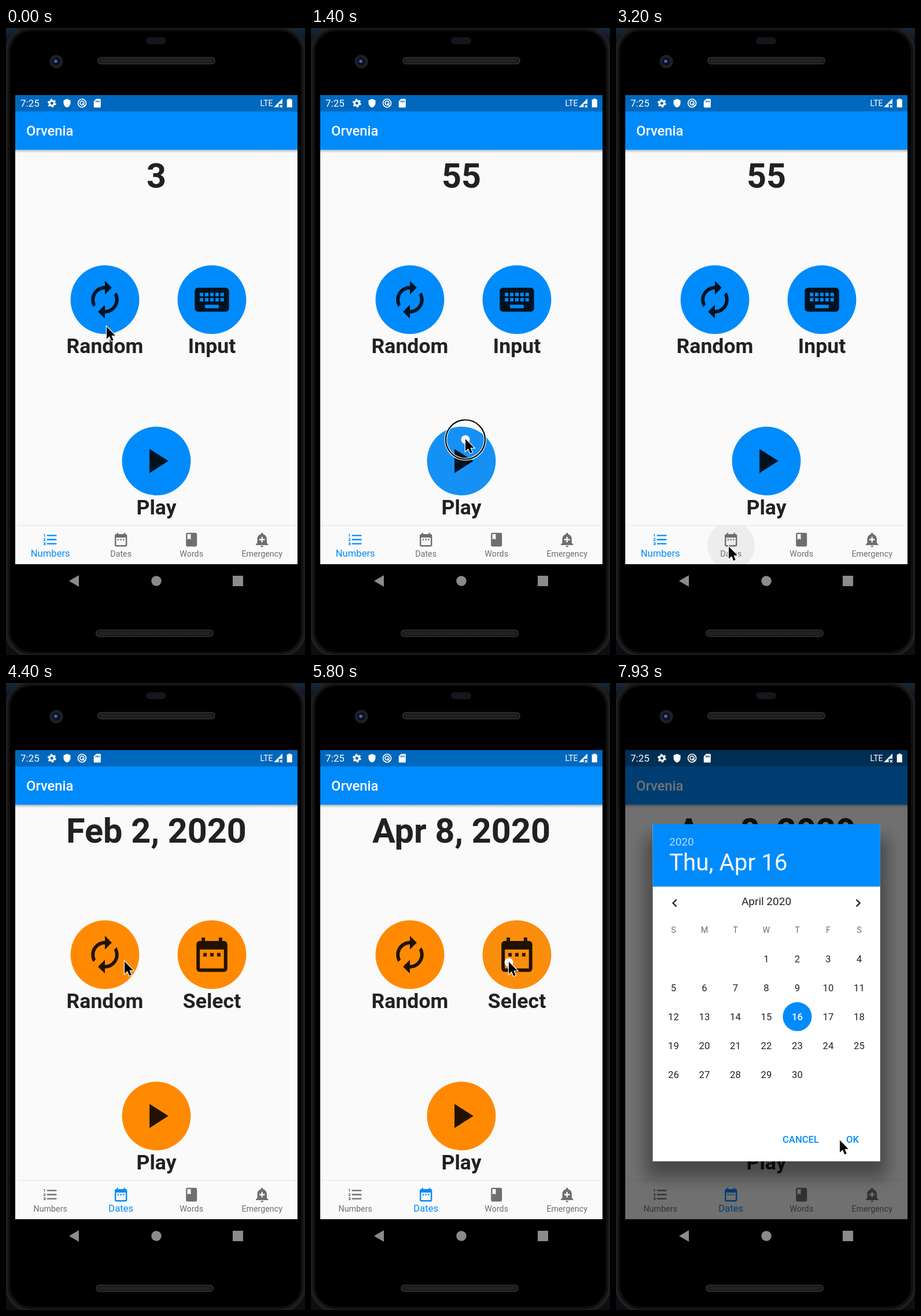
Write an HTML page that moves like this. It is 517 by 1084 pixels and loops after 8000 ms.

```html
<!DOCTYPE html>
<html lang="en">
<head>
<meta charset="utf-8">
<title>Speech practice app</title>
<style>
  html, body { margin: 0; width: 100%; height: 100%; overflow: hidden; background: #000; }
  svg { display: block; width: 100vw; height: 100vh; font-family: Roboto, sans-serif; }
  .ink { fill: #000; fill-opacity: .87; }
  .mid { text-anchor: middle; }
  .bold { font-weight: 700; }
  .medium { font-weight: 500; }
</style>
</head>
<body>
<svg id="stage" viewBox="0 0 517 1084"></svg>
<script>
const LOOP = 8000, BLUE = '#008bfc', ORANGE = '#ff8a02', GREY = '#6e6e6e';
const DP = 1.1875;

// 24-unit icons
const ICONS = {
  renew: '<path id="half" d="M12 6v3l4-4-4-4v3c-4.42 0-8 3.58-8 8 0 1.57.46 3.03 1.24 4.26L6.7 14.8c-.45-.83-.7-1.79-.7-2.8 0-3.31 2.69-6 6-6z"/><use href="#half" transform="rotate(180 12 12)"/>',
  keyboard: '<path fill-rule="evenodd" d="M4 5H20a2 2 0 0 1 2 2V17a2 2 0 0 1-2 2H4a2 2 0 0 1-2-2V7a2 2 0 0 1 2-2z' +
    [8, 11].map(y => [5, 8, 11, 14, 17].map(x => `M${x} ${y}h2v2h-2z`).join('')).join('') + 'M8 15h8v2H8z"/>',
  play: '<path d="M8 5v14l11-7z"/>',
  date: '<path d="M9 11H7v2h2zm4 0h-2v2h2zm4 0h-2v2h2zm2-7h-1V2h-2v2H8V2H6v2H5c-1.1 0-2 .9-2 2v14c0 1.1.9 2 2 2h14c1.1 0 2-.9 2-2V6c0-1.1-.9-2-2-2zm0 16H5V9h14z"/>',
  list: '<path d="M2 17h2v.5H3v1h1v.5H2v1h3v-4H2zm1-9h1V4H2v1h1zm-1 3h1.8L2 13.1v.9h3v-1H3.2L5 10.9V10H2zm5-6v2h14V5zm0 14h14v-2H7zm0-6h14v-2H7z"/>',
  book: '<path fill-rule="evenodd" d="M18 2H6c-1.1 0-2 .9-2 2v16c0 1.1.9 2 2 2h12c1.1 0 2-.9 2-2V4c0-1.1-.9-2-2-2zM6 4h5v8l-2.5-1.5L6 12z"/>',
  alert: '<path fill-rule="evenodd" d="M10 21a2 2 0 0 0 4 0zM18.9 16.8V11c0-3.25-2.25-5.97-5.3-6.7v-.7a1.6 1.6 0 0 0-3.2 0v.7C7.4 5 5.1 7.75 5.1 11v5.8L3 18.9V20h18v-1.1zM16 13h-3v3h-2v-3H8v-2h3V8h2v3h3z"/>'
};
const icon = (name, x, y, size, attrs) =>
  `<g ${attrs} transform="translate(${x - size / 2} ${y - size / 2}) scale(${size / 24})">${ICONS[name]}</g>`;
const label = (x, y, size, str, attrs = '') =>
  `<text x="${x}" y="${y}" font-size="${size}" ${attrs}>${str}</text>`;

const speaker = (x, y) =>
  `<rect x="${x}" y="${y}" width="202" height="11" rx="5" fill="#191919" stroke="#353535" stroke-width="1.5"/>
   <path d="M${x + 5} ${y + 5.5}h192" stroke="#262626" stroke-width="5" stroke-dasharray="2 1"/>`;

const button = (id, x, y, name, text) =>
  `<circle class="disc" cx="${x}" cy="${y}" r="59.4"/>
   <circle id="${id}Glow" cx="${x}" cy="${y}" r="59.4" fill="#bebebe" opacity="0"/>
   <g id="${id}Icon">${icon(name, x, y, 60 * DP, 'class="ink"')}</g>
   ${label(x, y + 92.6, 30 * DP, text, `id="${id}Text" class="ink mid bold"`)}`;

const TABS = [['list', 'Numbers'], ['date', 'Dates'], ['book', 'Words'], ['alert', 'Emergency']];
const tabs = TABS.map(([name, text], i) => {
  const x = 76.7 + 122 * i;
  return `<g id="tab${i}">${icon(name, x, 884.5, 24 * DP, '')}${label(x, 914, 14.25, text, 'class="mid"')}</g>`;
}).join('');

const dayX = col => 99.4 + 53.5 * col;
const dayY = row => 477 + 49.9 * row;
const cell = day => [dayX((day + 2) % 7), dayY(Math.floor((day + 2) / 7))];
const weekdays = [...'SMTWTFS'].map((c, i) =>
  label(dayX(i), 432, 14.25, c, `class="mid" fill="${GREY}"`)).join('');
const days = Array.from({ length: 30 }, (_, i) => {
  const [x, y] = cell(i + 1);
  return label(x, y + 6, 14 * DP, i + 1, `id="day${i + 1}" class="mid"`);
}).join('');

document.getElementById('stage').innerHTML = `
<defs>
  <linearGradient id="desk" x2="0" y2="1"><stop stop-color="#16283c"/><stop offset=".03" stop-color="#0c0e12"/></linearGradient>
  <linearGradient id="fall" x2="0" y2="1"><stop stop-opacity=".28"/><stop offset="1" stop-opacity="0"/></linearGradient>
  <clipPath id="bar"><rect x="16" y="860.5" width="488" height="66.5"/></clipPath>
  <filter id="blur" x="-20%" y="-20%" width="140%" height="140%"><feGaussianBlur stdDeviation="14"/></filter>
</defs>
<rect width="517" height="1084" fill="url(#desk)"/>
<rect x="1" y="-1" width="515" height="1086" rx="42" stroke="#1e1f20" stroke-width="5"/>
<rect x="5" y="3" width="507" height="1078" rx="39" fill="none" stroke="#111" stroke-width="4"/>
<rect x="242" y="16" width="35" height="12" rx="6" fill="#14161d"/>
${speaker(159, 51)}${speaker(156, 1041)}
<circle cx="87" cy="58" r="11.5" fill="#1f2023"/><circle cx="87" cy="58" r="7" fill="#0d1122"/><circle cx="86" cy="57.5" r="2.8" fill="#4a63b0"/>
<g fill="#8b8b8b"><path d="M109 956l17-10v20z"/><circle cx="260" cy="956" r="8.7"/><rect x="392" y="947" width="18" height="18"/></g>

<rect x="16" y="116" width="488" height="811" fill="#fafafa"/>
<rect x="16" y="210" width="488" height="6" fill="url(#fall)"/>
<rect x="16" y="116" width="488" height="94.5" fill="${BLUE}"/>
<rect x="16" y="116" width="488" height="28.3" fill-opacity=".25"/>
${label(35, 186, 20 * DP, 'Orvenia', 'fill="#fff" class="medium"')}
${label(260, 276, 50 * DP, '', 'id="heading" class="ink mid bold"')}
${button('random', 171, 469.7, 'renew', 'Random')}
${button('choose', 356, 469.7, 'keyboard', 'Input')}
${button('play', 260, 748.6, 'play', 'Play')}
<rect x="16" y="859" width="488" height="1.8" fill="#eee"/>
<circle id="ripple" cx="199" cy="895" clip-path="url(#bar)" fill-opacity=".05"/>
${tabs}

<g id="modal">
  <rect x="16" y="116" width="488" height="811" fill-opacity=".55"/>
  <rect x="51" y="266" width="418" height="590" fill-opacity=".36" filter="url(#blur)"/>
  <rect x="63.5" y="244" width="393.3" height="583" fill="#fff"/>
  <rect x="63.5" y="244" width="393.3" height="108" fill="${BLUE}"/>
  ${label(92, 280.5, 16 * DP, '2020', 'fill="#fff" fill-opacity=".7"')}
  ${label(92, 324, 34 * DP, '', 'id="picked" fill="#fff"')}
  ${label(260, 384, 16 * DP, 'April 2020', 'class="ink mid"')}
  <path d="M104.5 374.5l-6 6 6 6M415.5 374.5l6 6-6 6" fill="none" stroke="#212121" stroke-width="2.4"/>
  ${weekdays}
  <circle id="spot" r="25" fill="${BLUE}"/>
  ${days}
  <g fill="${BLUE}" class="medium">${label(319.5, 795.3, 14 * DP, 'CANCEL', 'class="mid"')}${label(409, 795.3, 14 * DP, 'OK', 'class="mid"')}</g>
</g>

<g fill="#fff">
  ${label(25, 136.3, 17, '7:25')}
  <circle cx="79.3" cy="130" r="4.1" fill="none" stroke="#fff" stroke-width="3.2"/>
  <circle cx="79.3" cy="130" r="6.2" fill="none" stroke="#fff" stroke-width="2.4" stroke-dasharray="3.25 3.24"/>
  <path d="M105.5 122.5l6 2.6v4.4c0 4-2.6 7-6 8-3.4-1-6-4-6-8v-4.4z"/>
  <g fill="none" stroke="#fff" stroke-width="1.7"><circle cx="131.5" cy="130" r="7"/><circle cx="131.5" cy="129.7" r="3.4"/><path d="M131.5 130l5 5"/></g>
  <path fill-rule="evenodd" d="M156 122.5h6.5a1.3 1.3 0 0 1 1.3 1.3v12.4a1.3 1.3 0 0 1-1.3 1.3h-9.5a1.3 1.3 0 0 1-1.3-1.3v-9.4zM155 125.5h1.5v3H155zm2.6 0h1.5v3h-1.5zm2.6 0h1.5v3h-1.5z"/>
  ${label(439.5, 135, 14, 'LTE')}
  <path d="M463 137l15-15v9h-6.5v6z"/><path d="M473.5 133l4.5 4.5m0-4.5l-4.5 4.5" stroke="#fff" stroke-width="1.3"/>
  <path d="M488.5 122h3.5v1.5h2.8v13.7h-9.1v-13.7h2.8z"/>
</g>

<g id="tap">
  <circle id="dot" r="7.5" fill="#fff"/>
  <g id="ring" fill="none"><circle r="34" stroke="#fff" stroke-width="4.5"/><circle r="34" stroke="#000" stroke-width="2.2"/></g>
</g>
<path id="cursor" d="M0 0V21L4.9 16.6 8.3 24.5 11.7 23 8.4 15.3H14.9z" stroke="#fff" stroke-width="2.4" paint-order="stroke"/>
`;

const el = id => document.getElementById(id);
const set = (id, attrs) => { for (const k in attrs) el(id).setAttribute(k, attrs[k]); };
const put = (id, str) => { if (el(id).textContent !== str) el(id).textContent = str; };
const ramp = (t, from, to) => Math.min(1, Math.max(0, (t - from) / (to - from)));
const ease = p => p * p * (3 - 2 * p);
const show = (id, on) => { el(id).style.display = on ? '' : 'none'; };

// Cursor moves: start, end, x, y
const MOVES = [
  [0, 0, 174, 516.5], [650, 1230, 267, 710.5], [2250, 2820, 195, 896.5], [3480, 4300, 205, 481.5],
  [5000, 5560, 342, 482], [6150, 6660, 303, 567.5], [7150, 7820, 387, 790.5]
];
const PRESSES = [330, 1300, 2900, 4560, 5625, 6860];
const GLOWS = { random: [330, 4560], choose: [5625], play: [1300] };
const RESULT_AT = 470, TAB_AT = 3270, DATE_AT = 4700, MODAL_AT = 5900, PICK_AT = 7000;

function cursorAt(t) {
  let [, , x, y] = MOVES[0];
  for (const [from, to, nx, ny] of MOVES.slice(1)) {
    const p = ease(ramp(t, from, to));
    x += (nx - x) * p;
    y += (ny - y) * p;
  }
  return [x, y];
}

let page = '', chosen = 0;
function setPage(dates) {
  if (page === dates) return;
  page = dates;
  document.querySelectorAll('.disc').forEach(d => d.setAttribute('fill', dates ? ORANGE : BLUE));
  el('chooseIcon').innerHTML = icon(dates ? 'date' : 'keyboard', 356, 469.7, 60 * DP, 'class="ink"');
  put('chooseText', dates ? 'Select' : 'Input');
}
function setDay(day) {
  if (chosen === day) return;
  chosen = day;
  const [cx, cy] = cell(day);
  set('spot', { cx, cy });
  for (let i = 1; i <= 30; i++)
    set('day' + i, i === day ? { fill: '#fff', 'font-weight': 500 } : { fill: '#212121', 'font-weight': 400 });
  put('picked', day === 8 ? 'Wed, Apr 8' : 'Thu, Apr 16');
}

function draw(t) {
  const dates = t >= TAB_AT;
  setPage(dates);
  put('heading', dates ? (t < DATE_AT ? 'Feb 2, 2020' : 'Apr 8, 2020') : (t < RESULT_AT ? '3' : '55'));

  const swap = ease(ramp(t, TAB_AT, TAB_AT + 200));
  [1 - swap, swap, 0, 0].forEach((on, i) => {
    set('tab' + i, { fill: on > .5 ? BLUE : GREY });
    el('tab' + i).querySelector('text').setAttribute('font-size', (12 + 2 * on) * DP);
  });
  set('ripple', { r: 41 * ramp(t, 2980, 3200) + 30 * ramp(t, 3200, 3350), opacity: 1 - ramp(t, 3230, 3430) });

  for (const id in GLOWS) {
    const glow = Math.max(...GLOWS[id].map(p => ramp(t, p + 40, p + 100) * (1 - ramp(t, p + 110, p + 250))));
    set(id + 'Glow', { opacity: .11 * glow });
  }

  show('modal', t >= MODAL_AT);
  set('modal', { opacity: ease(ramp(t, MODAL_AT, MODAL_AT + 180)) });
  setDay(t < PICK_AT ? 8 : 16);

  const [x, y] = cursorAt(t);
  set('cursor', { transform: `translate(${x} ${y})` });
  set('tap', { transform: `translate(${x} ${y + 1})` });
  const held = t - (PRESSES.filter(p => p <= t).pop() ?? -LOOP);
  show('ring', held < 130);
  show('dot', held >= 70 && held < 270);
  set('dot', { opacity: 1 - ramp(held, 180, 270) });
}

function tick() {
  draw(performance.now() % LOOP);
  requestAnimationFrame(tick);
}
tick();
</script>
</body>
</html>
```
